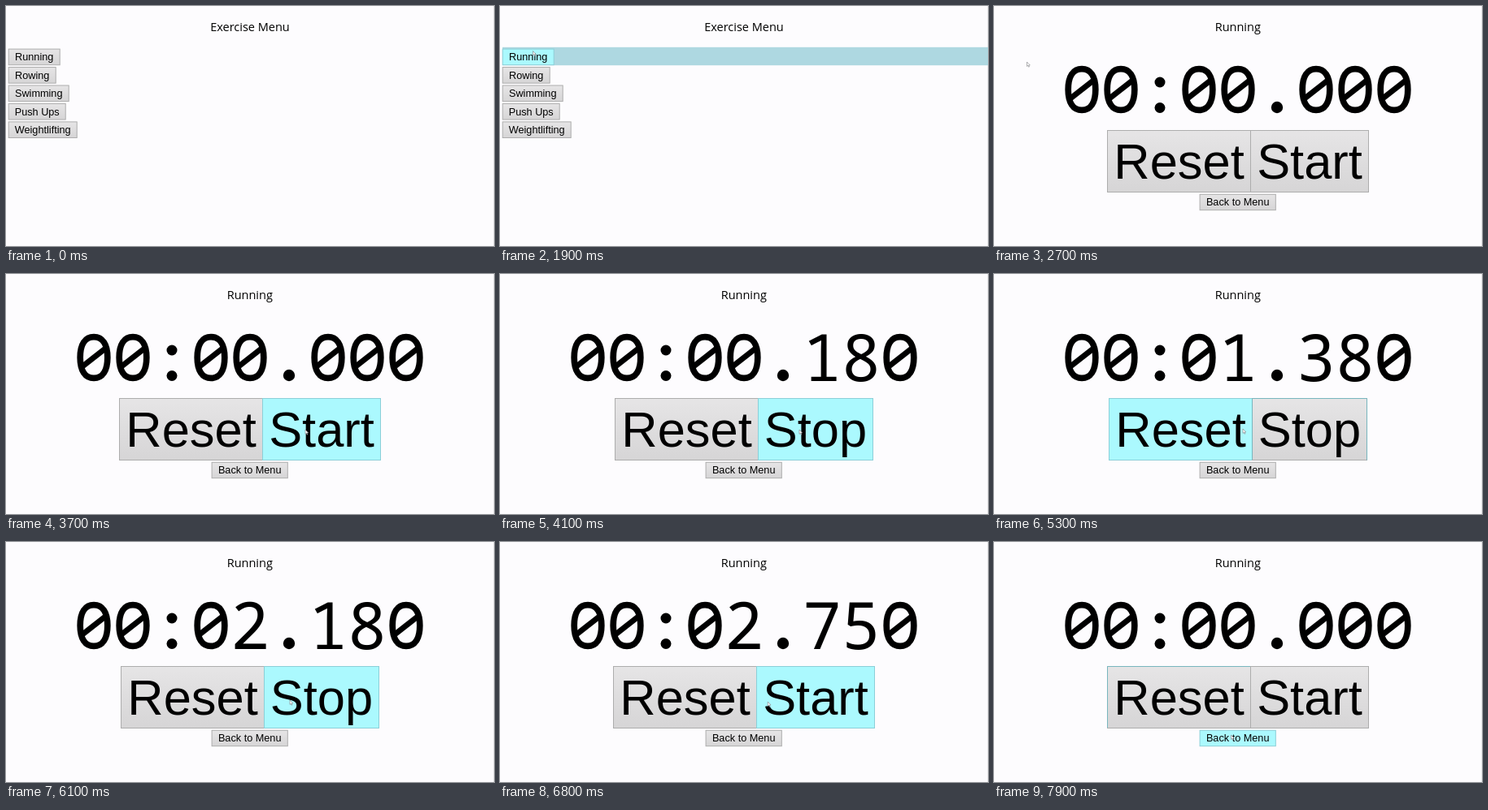
An HTML page that plays this animation: 600 by 296 pixels, repeating every 8 s.

```html
<!DOCTYPE html>
<html lang="en">
<head>
<meta charset="utf-8">
<title>Exercise Menu</title>
<style>
  html, body { margin: 0; width: 100%; height: 100%; overflow: hidden; background: #fdfcfe; }
  svg { display: block; width: 600px; height: 296px; }
  text { fill: #000; text-anchor: middle; }
  .title { font: 14.5px "Open Sans", "Noto Sans", sans-serif; }
  .clock { font: 80px "Noto Sans Mono", monospace; }
  .drawn { fill: none; }
  .label { font-family: "Liberation Sans", Arial, sans-serif; }
</style>
</head>
<body>
<svg id="stage" viewBox="0 0 600 296">
  <defs>
    <linearGradient id="face" x2="0" y2="1">
      <stop stop-color="#e6e5e6"/>
      <stop offset="1" stop-color="#d6d5d6"/>
    </linearGradient>
    <g id="zero" fill="none" stroke="#000">
      <path stroke-width="7.7" d="M-16.8 0C-16.8-16.5-10.5-25.4 0-25.4S16.8-16.5 16.8 0S10.5 25.4 0 25.4S-16.8 16.5-16.8 0Z"/>
      <path stroke-width="6.8" d="M-14 11L14-11"/>
    </g>
  </defs>
  <path d="M599.5 0V296" stroke="#eeedef"/>
  <g id="view"></g>
  <path id="cursor" d="M0 0V5.4L1.3 4.3L2.2 6.3L2.9 5.9L2.1 4H3.8Z"
        fill="#fff" stroke="#7d7d82" stroke-width=".6"/>
</svg>
<script>
const LOOP = 8000, STEP = 100;
const PAGE_AT = 2600, START_AT = 3920, STOP_AT = 6670, RESET_AT = 7400;
const MENU = [["Running", 64], ["Rowing", 59], ["Swimming", 75], ["Push Ups", 71], ["Weightlifting", 85]];

// Pointer path: time, x, y
const PATH = [
  [1700, 36, 28], [1800, 39, 46], [1900, 40.5, 55.5], [2000, 40.5, 69], [3100, 40.5, 69],
  [3400, 190, 130], [3700, 368, 192], [4700, 368, 192], [5100, 306, 191], [5700, 306, 191],
  [6000, 349, 195], [6700, 349, 195], [7100, 270, 203], [7400, 270, 203], [7900, 291.5, 238]
];

const view = document.getElementById("view");
const cursor = document.getElementById("cursor");

function pointerAt(t) {
  if (t < PATH[0][0]) return { x: -50, y: -50 };
  const i = PATH.findIndex(p => p[0] > t);
  if (i < 0) return { x: PATH.at(-1)[1], y: PATH.at(-1)[2] };
  const [t0, x0, y0] = PATH[i - 1], [t1, x1, y1] = PATH[i];
  const k = (t - t0) / (t1 - t0);
  return { x: x0 + (x1 - x0) * k, y: y0 + (y1 - y0) * k };
}

const inside = (p, x, y, w, h) => p.x >= x && p.x < x + w && p.y >= y && p.y < y + h;

const text = (kind, x, y, words, size = "") =>
  `<text class="${kind}" x="${x}" y="${y}"${size && ` font-size="${size}"`}>${words}</text>`;

function button(p, words, x, y, w, h, size, focused = false) {
  const hot = inside(p, x, y, w, h);
  const box = `<rect x="${x + .5}" y="${y + .5}" width="${w - 1}" height="${h - 1}"
    fill="${hot ? "#abf9fe" : "url(#face)"}" stroke="${hot ? "#8ccfd8" : "#adadad"}"/>`;
  const ring = focused && !hot
    ? `<path d="M${x + .5} ${y + h - 1}V${y + .5}h${w - 1}v${h - 1}" fill="none" stroke="#78b6be"/>` : "";
  return box + ring + text("label", x + w / 2, y + h / 2 + size * .3465, words, size);
}

function menuPage(p) {
  return text("title", 300, 31, "Exercise Menu") + MENU.map(([name, w], i) => {
    const y = 50.8 + i * 22.45;
    const row = inside(p, 3, y, 597, 22.4)
      ? `<rect x="3" y="${y}" width="597" height="22.4" fill="#aed8e1"/>` : "";
    return row + button(p, name, 2.7, y + 1.8, w, 20.6, 12.7);
  }).join("");
}

function clockText(ms) {
  const pad = (n, size) => String(n).padStart(size, "0");
  return `${pad(Math.floor(ms / 60000), 2)}:${pad(Math.floor(ms / 1000) % 60, 2)}.${pad(ms % 1000, 3)}`;
}

// Slashed zeros and round dots are drawn over the text, one 48px cell each
const dot = (x, y, r) => `<circle cx="${x}" cy="${y}" r="${r}"/>`;
const MARKS = {
  "0": x => `<use href="#zero" x="${x}" y="103"/>`,
  ":": x => dot(x, 94, 6.5) + dot(x, 125.5, 6.5),
  ".": x => dot(x, 125, 7.2)
};

function clock(ms) {
  const chars = [...clockText(ms)];
  const words = chars.map(c => MARKS[c] ? `<tspan class="drawn">${c}</tspan>` : c).join("");
  const marks = chars.map((c, i) => MARKS[c] ? MARKS[c](108 + i * 48) : "").join("");
  return text("clock", 300, 131.5, words) + marks;
}

function timerPage(p, t) {
  const running = t >= START_AT && t < STOP_AT;
  const elapsed = t >= RESET_AT ? 0 : Math.max(0, Math.min(t, STOP_AT) - START_AT);
  const left = running ? 141 : 139;
  const [name, width] = running ? ["Stop", 142] : ["Start", 146];
  return text("title", 299.8, 31, "Running") +
    clock(elapsed) +
    button(p, "Reset", left, 153, 177, 77, 61.4, t >= RESET_AT) +
    button(p, name, left + 176, 153, width, 77, 61.4, t >= START_AT && t < RESET_AT) +
    button(p, "Back to Menu", 252.6, 231.8, 94.2, 20.4, 12.7);
}

let shown = -1;
function draw(now) {
  const t = Math.floor(now % LOOP / STEP) * STEP;
  if (t !== shown) {
    shown = t;
    const p = pointerAt(t);
    view.innerHTML = t < PAGE_AT ? menuPage(p) : timerPage(p, t);
    cursor.setAttribute("transform", `translate(${p.x} ${p.y})`);
  }
}

const begin = performance.now();
function tick() {
  draw(performance.now() - begin);
  requestAnimationFrame(tick);
}
tick();
</script>
</body>
</html>
```
